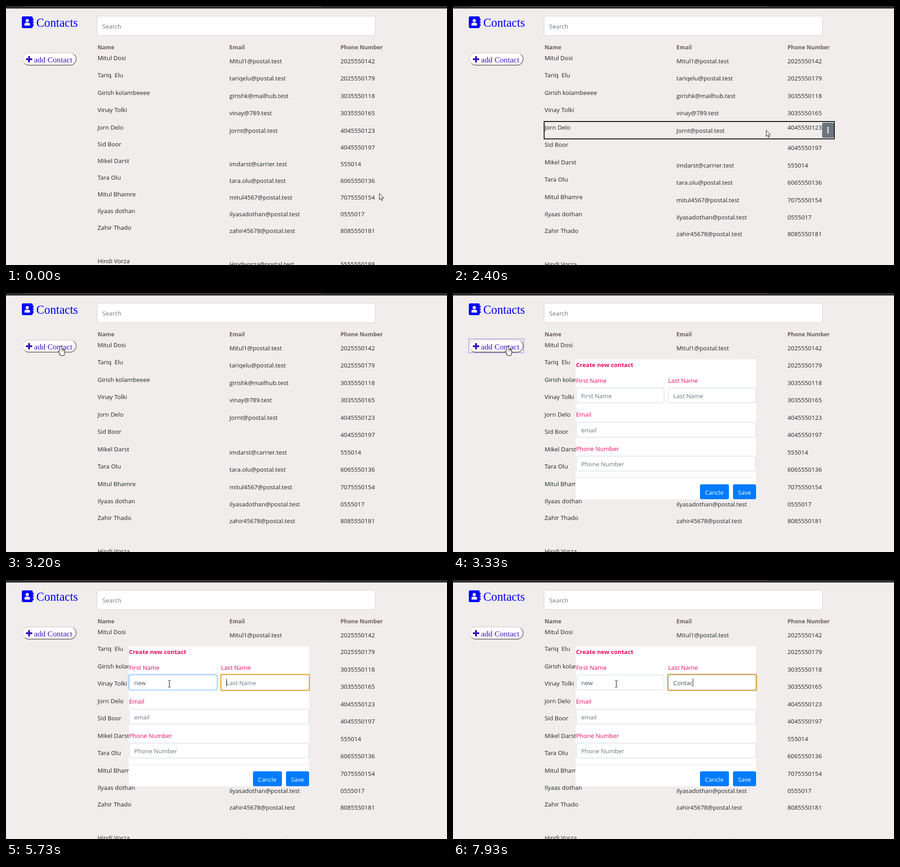
Animation, 975 px wide and 574 px high, one loop 8 s. Source, as an HTML page with a canvas:

```html
<!DOCTYPE html>
<html lang="en">
<head>
<meta charset="utf-8">
<title>Contacts</title>
<style>
html, body { margin: 0; width: 100%; height: 100%; overflow: hidden; background: #f0edec; }
canvas { display: block; }
</style>
</head>
<body>
<canvas id="stage" width="975" height="574"></canvas>
<script>
const ctx = document.getElementById('stage').getContext('2d');
const LOOP = 8000, STEP = 1000 / 15, BLINK = 530;
const OPEN = 3330, FOCUS = 3930, TAB = 5670, FADE = 150;
const SANS = '"Open Sans", "Noto Sans", sans-serif';
const SERIF = '"Liberation Serif", "Times New Roman", serif';
const BODY = '13.3px ' + SANS;
const PAGE = '#f0edec', PINK = '#ea0a5c', INK = '#212529', HINT = '#6c757d';
const BORDER = '#ced4da', BLUE = '#0000ff', INDIGO = '#3c10c0';

const contacts = [
  ['Mitul Dosi', 'Mitul1@postal.test', '2025550142'],
  ['Tariq  Elu', 'tariqelu@postal.test', '2025550179'],
  ['Girish kolambeeee', 'girishk@mailhub.test', '3035550118'],
  ['Vinay Tolki', 'vinay@789.test', '3035550165'],
  ['Jorn Delo', 'Jornt@postal.test', '4045550123'],
  ['Sid Boor', '', '4045550197'],
  ['Mikel Darst', 'imdarst@carrier.test', '555014'],
  ['Tara Olu', 'tara.olu@postal.test', '6065550136'],
  ['Mitul Bhamre', 'mitul4567@postal.test', '7075550154'],
  ['Ilyaas dothan', 'ilyasadothan@postal.test', '0555017'],
  ['Zahir Thado', 'zahir45678@postal.test', '8085550181'],
  ['', '', ''],
  ['Hindi Vorza', 'Hindivorza@postal.test', '5555550188']
];

// Pointer moves: start, end, target x and y, optional bend
const moves = [
  [0, 130, 724, 288],
  [2340, 2400, 715, 284],
  [2400, 3000, 116, 116, -150, -40],
  [3140, 3200, 118, 118],
  [3340, 3730, 361, 230]
];
const fields = [
  { word: 'new', focus: FOCUS, blur: TAB, keys: [4870, 5000, 5270] },
  { word: 'Contac', focus: TAB, blur: LOOP, keys: [6530, 6670, 6800, 7470, 7470, 7930] }
];

const clamp = v => Math.max(0, Math.min(1, v));
const inside = (p, x, y, w, h) => p.x > x && p.x < x + w && p.y > y && p.y < y + h;

function text(str, x, y, color = INK, font = BODY) {
  ctx.font = font;
  ctx.fillStyle = color;
  ctx.fillText(str, x, y);
}

function rect(x, y, w, h, color) {
  ctx.fillStyle = color;
  ctx.fillRect(x, y, w, h);
}

function round(x, y, w, h, r, fill, stroke, line = 1) {
  ctx.beginPath();
  ctx.roundRect(x, y, w, h, r);
  if (fill) { ctx.fillStyle = fill; ctx.fill(); }
  if (stroke) { ctx.strokeStyle = stroke; ctx.lineWidth = line; ctx.stroke(); }
}

function pointerAt(t) {
  let x = 832, y = 423;
  for (const [from, to, ex, ey, bx = (x + ex) / 2, by = (y + ey) / 2] of moves) {
    const p = clamp((t - from) / (to - from));
    const u = p * (2 - p), v = 1 - u;
    x = v * v * x + 2 * u * v * bx + u * u * ex;
    y = v * v * y + 2 * u * v * by + u * u * ey;
    if (p < 1) break;
  }
  return { x, y };
}

function drawHeader() {
  rect(0, 0, 975, 5.6, '#2d2a28');
  rect(43, 0, 655, 1, '#5b5856');

  round(35, 23, 24, 26, 3, BLUE);
  for (let y = 28; y <= 40; y += 6) round(59, y, 2, 4.5, 0.8, BLUE);
  round(43.4, 28.7, 7.2, 7.2, 3.6, PAGE);
  round(40.7, 37, 12.6, 6.4, [4, 4, 1.5, 1.5], PAGE);
  text('Contacts', 67, 46, BLUE, '26.3px ' + SERIF);

  round(201.5, 22.5, 615, 43, 3.5, '#fff', BORDER);
  text('Search', 213, 50, HINT);
  const bold = 'bold 12.4px ' + SANS;
  text('Name', 202.5, 96, '#6a5c63', bold);
  text('Email', 494, 96, '#6a5c63', bold);
  text('Phone Number', 739.5, 96, '#6a5c63', bold);
}

function drawAdd(focused) {
  // Bevel: light above the corner-to-corner diagonal, dark below
  const bevel = ctx.createLinearGradient(95, 114.5, 96.1, 120.4);
  bevel.addColorStop(0, '#dedbdb');
  bevel.addColorStop(1, '#807d7d');
  round(37, 104, 118, 27, 13.5, '#fff', bevel, 1.8);
  rect(44, 116, 14, 4, INDIGO);
  rect(49, 111, 4, 14, INDIGO);
  text('add Contact', 62, 125, INDIGO, '17.6px ' + SERIF);
  if (!focused) return;
  ctx.setLineDash([1, 1]);
  round(34.5, 101.5, 122, 31, 0, null, INDIGO);
  ctx.setLineDash([]);
}

function drawRows(t, pointer) {
  // Rows the pointer has crossed stay a little taller
  const grown = t < 70 ? 4 : 9;
  const lift = t >= 3530 ? 1 : 0;
  const live = t >= 70 && t < OPEN;
  contacts.forEach(([name, mail, phone], i) => {
    const y = Math.floor(120 + 37 * i + 1.5 * Math.min(i, grown)) - (i ? lift : 0);
    const over = live && inside(pointer, 201, y - 18, 642, 38.5);
    text(name, 202.5, y);
    text(mail, 494, y + 7);
    text(phone, 739.5, over ? y : y + 7);
    if (!over) return;
    round(201.5, y - 18, 641.5, 38.5, 0, null, '#111', 2);
    round(816, y - 15.5, 26, 33.5, 3.5, HINT);
    for (let d = -5; d <= 5; d += 5) round(827.2, y - 0.5 + d, 3.4, 3.4, 1, '#fff');
  });
}

function drawField(x, y, w, hint) {
  round(x + 0.5, y + 0.5, w - 1, 33, 3.5, '#fff', BORDER);
  text(hint, x + 11.5, y + 23, HINT);
}

function drawInput(t, x, w, hint, { word, focus, blur, keys }) {
  const y = 210;
  const pressed = keys.filter(k => k <= t);
  const value = word.slice(0, pressed.length);
  const active = t >= focus && t < blur;
  // The glow starts one step after focus moves
  const glow = clamp((t - focus - 30) / FADE) - clamp((t - blur - 30) / FADE);

  if (glow > 0) round(x - 1, y - 1, w + 2, 35, 4.5, null, `rgba(0,123,255,${0.27 * glow})`, 3);
  drawField(x, y, w, value ? '' : hint);
  if (glow > 0) round(x + 0.5, y + 0.5, w - 1, 33, 3.5, null, `rgba(128,189,255,${glow})`);
  if (active) round(x - 0.8, y - 0.8, w + 1.6, 35.6, 1.5, null, '#f5a51d', 2);
  text(value, x + 11.5, y + 23, '#495057');

  const idle = t - Math.max(focus, ...pressed);
  if (active && idle % (2 * BLINK) < BLINK) {
    rect(Math.round(x + 11.2 + ctx.measureText(value).width), y + 8, 1, 18, '#222');
  }
}

function drawButton(label, x, w) {
  round(x, 424, w, 33, 3.5, '#007bff');
  text(label, x + 11, 446.5, '#fff');
}

function drawForm(t) {
  rect(271.5, 147, 398.5, 310, '#fff');
  text('Create new contact', 272, 163.5, PINK, 'bold 13.1px ' + SANS);
  text('First Name', 272, 199, PINK);
  text('Last Name', 475.5, 199, PINK);
  text('Email', 272, 274, PINK);
  text('Phone Number', 272, 350, PINK);
  drawInput(t, 272, 195, 'First Name', fields[0]);
  drawInput(t, 475.5, 194.5, 'Last Name', fields[1]);
  drawField(272, 286, 398, 'email');
  drawField(272, 361, 398, 'Phone Number');
  rect(272, 408.5, 398, 1, '#e2e2e2');
  drawButton('Cancle', 546, 64);
  drawButton('Save', 619, 51);
}

function drawBeam() {
  rect(-0.5, -7, 1.2, 14, '#222');
  for (const y of [-8, 7]) {
    rect(-3, y, 2.5, 1, '#222');
    rect(0.7, y, 2.5, 1, '#222');
  }
}

function drawHand() {
  const hand = new Path2D();
  hand.roundRect(1.5, 0.5, 3.4, 13, 1.7);
  hand.roundRect(1.5, 7.5, 10, 8.5, 2.5);
  hand.roundRect(1.5, 12, 9, 8, 1);
  hand.moveTo(2, 11);
  hand.lineTo(-2, 11);
  hand.lineTo(2, 18);
  ctx.strokeStyle = '#111';
  ctx.lineWidth = 2;
  ctx.stroke(hand);
  ctx.fillStyle = '#fff';
  ctx.fill(hand);
  for (let x = 5; x < 11; x += 2.5) rect(x, 8, 0.8, 3.5, '#333');
}

function drawArrow() {
  const arrow = new Path2D('M.5.5V14l3.1-2.8 2.2 5.1 2.1-.9-2.2-5 4.3-.2z');
  ctx.fillStyle = '#fff';
  ctx.fill(arrow);
  ctx.strokeStyle = '#111';
  ctx.lineWidth = 1;
  ctx.stroke(arrow);
}

function drawPointer(t, p) {
  ctx.save();
  ctx.translate(Math.round(p.x), Math.round(p.y));
  ctx.lineJoin = 'round';
  if (t >= OPEN && inside(p, 272, 210, 195, 34)) drawBeam();
  else if (inside(p, 36, 103, 120, 29)) drawHand();
  else drawArrow();
  ctx.restore();
}

function draw(t) {
  const pointer = pointerAt(t);
  rect(0, 0, 975, 574, PAGE);
  drawHeader();
  drawRows(t, pointer);
  drawAdd(t >= OPEN && t < FOCUS);
  if (t >= OPEN) drawForm(t);
  drawPointer(t, pointer);
}

function tick(now) {
  const t = Math.floor(((now % LOOP) + 5) / STEP) * STEP + 4;
  draw(Math.min(t, LOOP - 1));
  requestAnimationFrame(tick);
}
requestAnimationFrame(tick);
</script>
</body>
</html>
```
